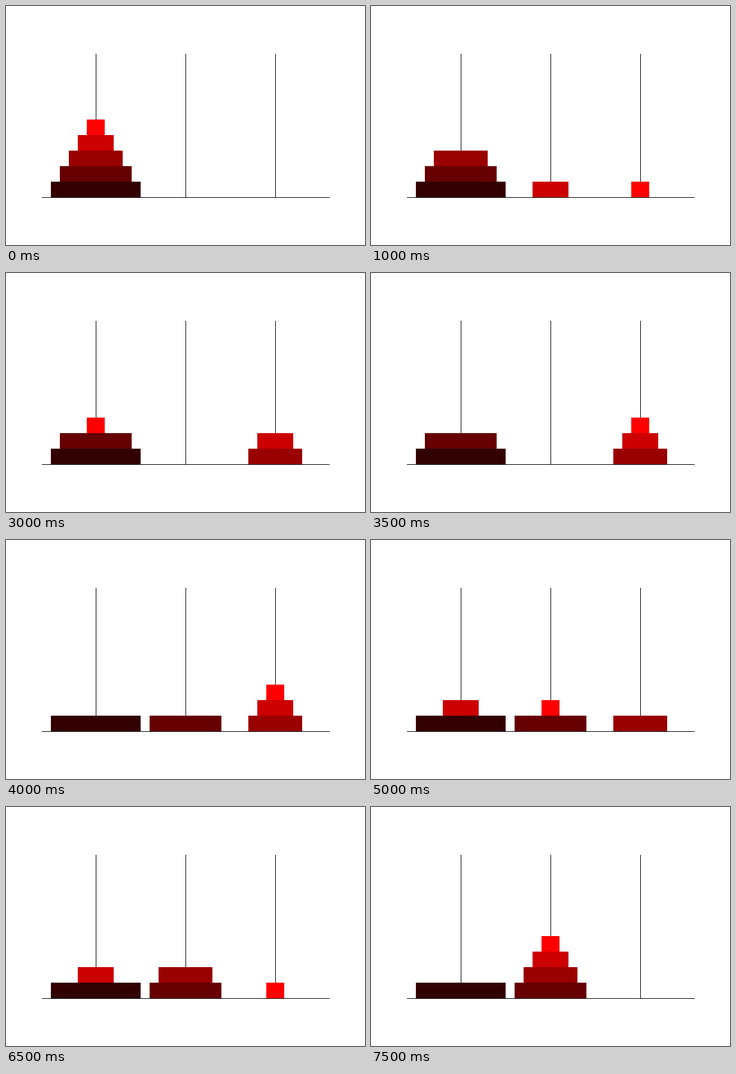
Recreate the animation shown at these times as an HTML page with a canvas. Size 600x400 px, loop 8000 ms.

```html
<!DOCTYPE html>
<html lang="en">
<head>
<meta charset="utf-8">
<title>Tower of Hanoi</title>
<style>
  html, body { margin: 0; width: 100%; height: 100%; overflow: hidden; background: #fff; }
  canvas { display: block; }
</style>
</head>
<body>
<canvas width="600" height="400"></canvas>
<script>
const ctx = document.querySelector('canvas').getContext('2d');
const DISKS = 5, STEP = 500, LOOP = 8000;
const BASE = 320, DISK_HEIGHT = 26;
const pegX = peg => 150 + 150 * peg;

function box(color, x, y, w, h) {
  ctx.fillStyle = color;
  ctx.fillRect(x, y, w, h);
}

// Peg of each disk (0 = smallest) after the given number of moves.
function pegsAfter(moves) {
  const pegs = Array(DISKS).fill(0);
  for (let n = 1; n <= moves; n++) {
    const disk = Math.log2(n & -n);
    pegs[disk] = ((n | (n - 1)) + 1) % 3;
  }
  return pegs;
}

function draw(moves) {
  box('#fff', 0, 0, 600, 400);
  box('#000', 60, BASE, 481, 1);
  for (let peg = 0; peg < 3; peg++) box('#000', pegX(peg), 80, 1, BASE - 80);

  const pegs = pegsAfter(moves);
  const heights = [0, 0, 0];
  for (let disk = DISKS - 1; disk >= 0; disk--) {
    const peg = pegs[disk];
    const width = 30 * (disk + 1);
    const y = BASE - DISK_HEIGHT * ++heights[peg];
    const red = 255 * (DISKS - disk) / DISKS;
    box(`rgb(${red}, 0, 0)`, pegX(peg) - width / 2, y, width, DISK_HEIGHT);
  }
}

function frame() {
  draw(Math.floor(performance.now() % LOOP / STEP));
  requestAnimationFrame(frame);
}
frame();
</script>
</body>
</html>
```
